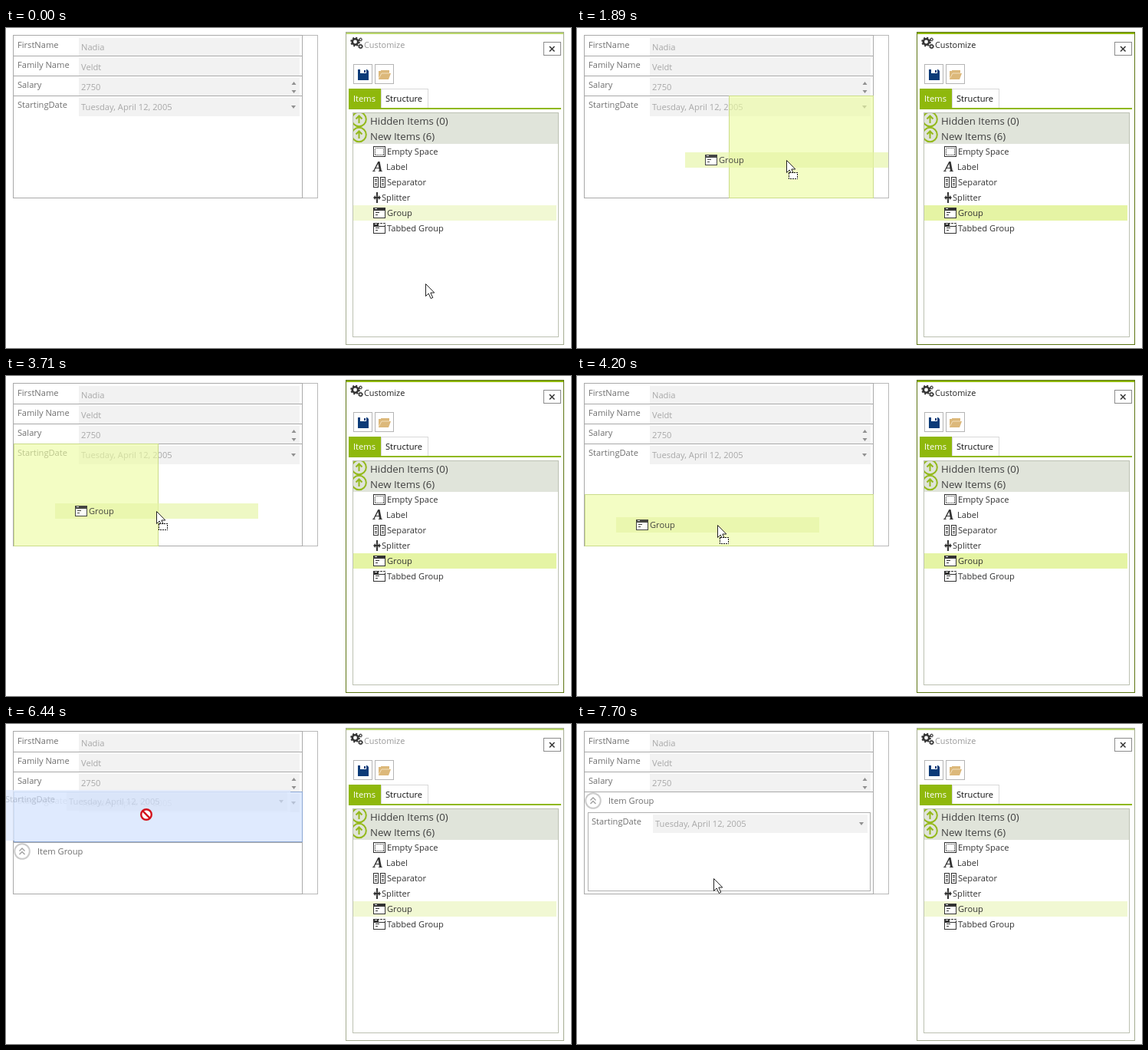
Write an HTML page that moves like this. It is 737 px wide and 417 px high and loops after 8000 ms.

```html
<!DOCTYPE html>
<html lang="en">
<head>
<meta charset="utf-8">
<title>Layout customization</title>
<style>
  html, body { margin: 0; width: 100%; height: 100%; overflow: hidden; background: #fff; }
  svg { display: block; width: 737px; height: 417px; font: 11.15px "Open Sans", "Noto Sans", sans-serif; }
  text { white-space: pre; }
  rect { shape-rendering: crispEdges; }
</style>
</head>
<body>
<svg id="stage" viewBox="0 0 737 417"></svg>
<script>
const LOOP = 8000, STEP = 70;
const LABEL = '#707070', VALUE = '#a8a8a8', INK = '#333', GREEN = '#8fb80c';

// ---- markup helpers ----
const box = (x, y, w, h, fill, extra = '') => `<rect x="${x}" y="${y}" width="${w}" height="${h}" fill="${fill}" ${extra}/>`;
const frame = (x, y, w, h, stroke, fill = 'none', extra = '') =>
  box(x + .5, y + .5, w - 1, h - 1, fill, `stroke="${stroke}" ${extra}`);
const text = (x, y, str, fill = INK, extra = '') => `<text x="${x}" y="${y}" fill="${fill}" ${extra}>${str}</text>`;
const path = (d, fill, stroke = 'none', extra = '') => `<path d="${d}" fill="${fill}" stroke="${stroke}" ${extra}/>`;
const group = (id, body, extra = '') => `<g id="${id}" ${extra}>${body}</g>`;
const at = (x, y, body) => `<g transform="translate(${x} ${y})">${body}</g>`;
const arrow = (x, y, dir) => path(`M${x - 3} ${y - 2 * dir}h6l-3 ${4 * dir}z`, '#909090');

// ---- form ----
const field = (label, value, y, h) =>
  box(95, y + 3, 288, h, '#f2f2f2') + text(15, y + 16, label, LABEL) + text(98, y + 18.5, value, VALUE);

const dateItem = (width = 288) =>
  box(85, 3, width, 24, '#f2f2f2') + text(5, 15.5, 'StartingDate', LABEL) +
  text(88, 18.5, 'Tuesday, April 12, 2005', VALUE) + arrow(77 + width, 15, 1);

const groupHeader = y =>
  box(10, y, 377, 1, '#a9a9a9') +
  `<circle cx="21" cy="${y + 12}" r="9.8" fill="#fff" stroke="#cbcbcb" stroke-width="2"/>` +
  path(`M17.5 ${y + 11.5}l3.5 -3.5l3.5 3.5M17.5 ${y + 16}l3.5 -3.5l3.5 3.5`, 'none', '#a0a0a0', 'stroke-width="1.4"') +
  text(41, y + 16, 'Item Group', LABEL);

const form =
  frame(9, 9, 398, 213, '#b9b9b9') +
  field('FirstName', 'Nadia', 10, 23) + field('Family Name', 'Veldt', 36, 23) + field('Salary', '2750', 62, 23) +
  arrow(375.5, 72, -1) + arrow(375.5, 83, 1) +
  [36, 62, 88].map(y => box(10, y, 377, 1, '#a9a9a9')).join('') +
  group('looseDate', at(10, 88, dateItem())) +
  group('emptyGroup', groupHeader(154)) +
  group('filledGroup', groupHeader(88) + frame(14, 115, 369, 103, '#b0b0b0') + at(14, 115, dateItem(280))) +
  frame(9, 9, 378, 213, '#a9a9a9');

// ---- list icons, each about 16 x 14 ----
const windowIcon = dash =>
  frame(0, 0, 16, 14, INK, '#fff', dash) + box(0, 0, dash ? 7 : 16, 4, INK) +
  box(2, 1, 3, 1, '#fff') + box(3, 6, 5, 1, INK) + box(3, 9, 3, 1, INK);
const page = x => frame(x, 0, 7, 14, INK) + [3, 5, 8, 10].map(y => box(x + 2, y, 3, 1, INK)).join('');
const icons = {
  space: frame(0, 0, 16, 14, INK) + frame(2, 2, 12, 10, INK, 'none', 'stroke-dasharray="1 1"'),
  label: text(0, 13, 'A', INK, 'style="font:italic bold 19px \'Liberation Serif\',serif"'),
  separator: page(0) + page(9),
  splitter: box(4, 0, 2, 14, INK) + path('M0 7l3-3v6zM10 7l-3-3v6z', INK) + box(2, 6, 6, 2, INK),
  group: windowIcon(''),
  tabbed: windowIcon('stroke-dasharray="3 1"') + frame(0, 4, 16, 10, INK)
};
const listRows = [
  ['space', 'Empty Space', 497], ['label', 'Label', 496], ['separator', 'Separator', 497],
  ['splitter', 'Splitter', 490], ['group', 'Group', 497], ['tabbed', 'Tabbed Group', 497]
];

// ---- customize window ----
const gear = (x, y, r) =>
  `<circle cx="${x}" cy="${y}" r="${r}" fill="none" stroke="${INK}" stroke-width="${r * .7}"/>
   <circle cx="${x}" cy="${y}" r="${r * 1.45}" fill="none" stroke="${INK}" stroke-width="${r * .5}"
     stroke-dasharray="${r * .57}"/>`;

const listHeader = (y, title) =>
  `<g clip-path="url(#list)"><circle cx="460.5" cy="${y - 1}" r="9.3" fill="none" stroke="#94b91c" stroke-width="2"/>` +
  path(`M460.5 ${y + 4}v-9M456.5 ${y - 1.5}l4-4l4 4`, 'none', '#94b91c', 'stroke-width="2"') + '</g>' +
  text(475, y + 5.5, title, '#404040', 'font-size="13.25"');

const dialog =
  '<clipPath id="list"><rect x="453" y="111" width="267" height="40"/></clipPath>' +
  frame(443, 5, 285, 408, '#a5ad92', '#fff', 'id="border"') + box(444, 6, 283, 2, '#b9d76a', 'id="topBar"') +
  gear(455.5, 18, 3.7) + gear(462.5, 24, 2) + gear(462.5, 15, 1.5) +
  text(467, 26, 'Customize', '#999', 'id="title" font-size="10.9"') +
  frame(701, 18, 23, 18, '#8c8c8c') + path('M709 24l6.5 6.5M715.500 24l-6.5 6.5', 'none', INK, 'stroke-width="1.5"') +
  frame(453, 47, 25, 26, '#b5b5b5') + path('M459 54h12l2 2v12h-14z', '#0c3b78') +
  box(462, 54, 8, 5, '#fff') + box(467, 55, 2, 3, '#0c3b78') + box(462, 63, 8, 5, '#0c3b78') +
  frame(481, 47, 25, 26, '#b5b5b5') + path('M486 67v-11h3v-1h11v4h2l-3 8z', '#dcb87a') +
  path('M486 66l4-7h10', 'none', '#f3dfbb') +
  box(447, 79, 42, 26, GREEN) + frame(489, 79, 62, 26, '#d9d9d9', '#fff') + box(447, 104, 277, 2, GREEN) +
  text(453, 96, 'Items', '#fff') + text(495, 96, 'Structure', '#111') +
  frame(452, 110, 269, 293, '#bcc1b2') + box(453, 111, 267, 40, '#e0e4da') +
  listHeader(120, 'Hidden Items (0)') + listHeader(140, 'New Items (6)') +
  box(453, 231, 265, 20, '#f1f8d3', 'id="selectedRow"') + box(453, 251, 265, 20, '#f4f9e0', 'id="hoverRow"') +
  listRows.map(([icon, name, x], i) => at(479, 154 + 20 * i, icons[icon]) + text(x, 165 + 20 * i, name)).join('');

// ---- drag feedback and pointer ----
const ITEM_BLUE = 'rgba(203,222,253,.62)';
const overlay =
  box(10.5, 88.5, 376, 65, ITEM_BLUE, 'id="pressedItem" stroke="#8ba6d2"') +
  box(0, 0, 0, 0, 'rgba(236,252,160,.62)', 'id="dropZone" stroke="#cbdc8a"') +
  group('rowGhost', box(0, 0, 265, 20, '#e5f4a4', 'opacity=".72"') +
    at(26, 3, icons.group) + text(44, 14, 'Group'), 'opacity=".9"') +
  group('itemGhost', box(0, 0, 377, 66, '#fff') + dateItem() + box(0, 0, 377, 66, ITEM_BLUE), 'opacity=".78"') +
  group('pointer',
    path('M.5 .5v16l3.700-3.500l3 6.500l2.600-1.200l-3-6.300h5z', '#fff', '#222') +
    group('dropMark', frame(3, 16, 12, 9, '#111', '#fff', 'stroke-dasharray="2 1"'))) +
  group('denied', '<circle r="6.800" fill="#fff" stroke="#d3121c" stroke-width="2.400"/>' +
    path('M-4.800-4.800l9.600 9.600', 'none', '#d3121c', 'stroke-width="2.400"'));

document.getElementById('stage').innerHTML = form + dialog + overlay;

// ---- motion: [first step, last step, x, y] ----
const moves = [
  [490, 910, 506, 244], [1050, 1050, 505, 241],
  [1540, 1540, 437, 218], [1610, 1680, 360, 190], [1750, 1890, 273, 172], [1960, 2030, 212, 181],
  [2170, 2520, 158, 159], [3010, 3010, 160, 160], [3220, 3290, 192, 181],
  [3710, 3710, 196, 176], [3780, 3850, 179, 196], [3990, 3990, 181, 196], [4200, 4200, 183, 194],
  [5110, 5180, 199, 183], [5460, 5460, 199, 180], [5530, 5740, 160, 138], [5810, 6160, 136, 94],
  [6300, 6440, 183, 118], [6510, 7070, 178, 191], [7140, 7280, 178, 201]
];

function pointerAt(t) {
  let x = 547, y = 333;
  for (const [first, last, toX, toY] of moves) {
    if (t < first) break;
    const p = Math.min(1, (t - first + STEP) / (last - first + STEP));
    x += (toX - x) * p;
    y += (toY - y) * p;
  }
  return [Math.round(x), Math.round(y)];
}

// The free area takes a drop on its top or bottom half, or in between on its left or right half.
function zoneAt(x, y) {
  if (x < 10 || x > 387 || y < 88 || y > 221) return null;
  if (y < 132) return [10, 88, 377, 67];
  if (y > 177) return [10, 154, 377, 68];
  return [x < 198 ? 10 : 198, 88, 189, 134];
}

const el = id => document.getElementById(id);
const show = (id, on) => el(id).style.display = on ? '' : 'none';
const place = (id, x, y) => el(id).setAttribute('transform', `translate(${x} ${y})`);
const during = (t, from, to) => t >= from && t < to;

function render(time) {
  const t = Math.floor(time % LOOP / STEP) * STEP;
  const [x, y] = pointerAt(t);
  const active = during(t, 1330, 6300);
  const rowDrag = during(t, 1540, 4690);
  const itemDrag = during(t, 6300, 7700);
  const denied = itemDrag && y < 154;

  el('border').setAttribute('stroke', active ? '#5d7614' : '#a5ad92');
  el('topBar').setAttribute('fill', active ? GREEN : '#b9d76a');
  el('title').setAttribute('fill', active ? '#222' : '#999');
  el('selectedRow').setAttribute('fill', active ? '#e5f4a4' : '#f1f8d3');
  show('hoverRow', t < 1330 && y >= 251 && y < 271);

  show('looseDate', t < 7700);
  show('emptyGroup', during(t, 4690, 7700));
  show('filledGroup', t >= 7700);
  show('pressedItem', itemDrag);

  const zone = rowDrag ? zoneAt(x, y) : itemDrag && !denied ? [14, 181, 369, 37] : null;
  show('dropZone', zone);
  if (zone) {
    const [zx, zy, w, h] = zone;
    Object.entries({ x: zx + .5, y: zy + .5, width: w - 1, height: h - 1 })
      .forEach(([name, value]) => el('dropZone').setAttribute(name, value));
  }

  show('rowGhost', rowDrag);
  show('itemGhost', itemDrag);
  place('rowGhost', x - 132, y - 10);
  place('itemGhost', x - 189, y - 32);
  show('pointer', !denied);
  show('dropMark', rowDrag || itemDrag);
  show('denied', denied);
  place('pointer', x, y);
  place('denied', x, y);
}

const start = performance.now();
function tick() {
  render(performance.now() - start);
  requestAnimationFrame(tick);
}
tick();
</script>
</body>
</html>
```
